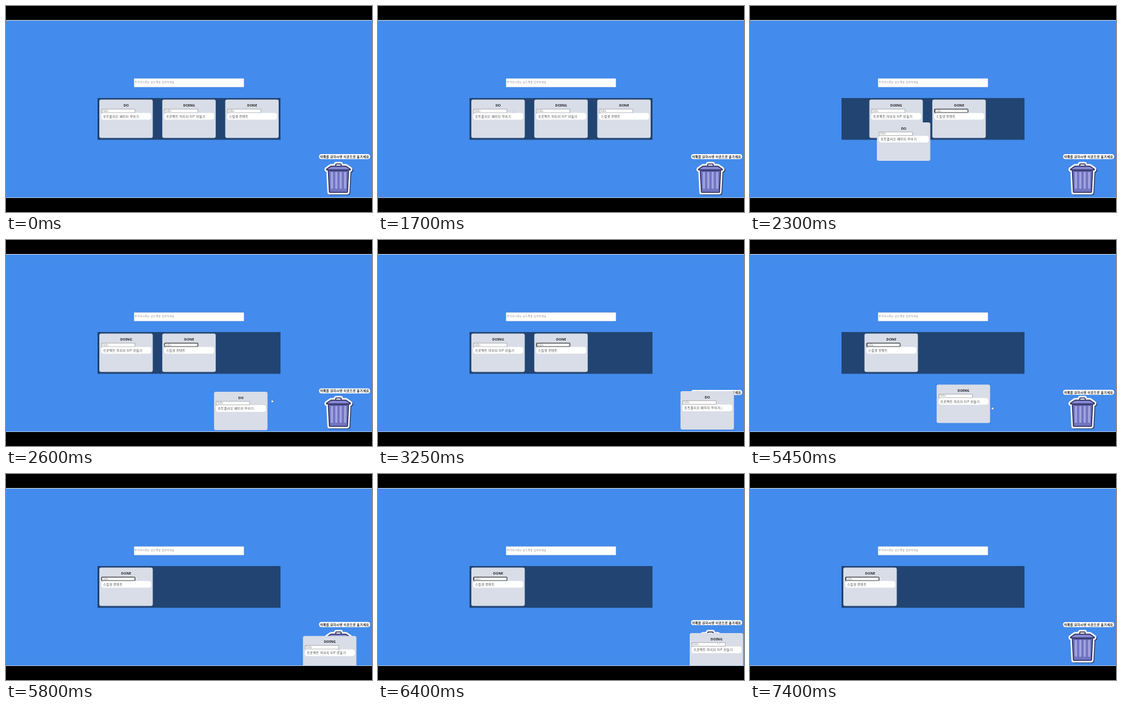
An HTML page with a canvas for the animation above (7.45 s loop, 600 by 338 pixels).

```html
<!DOCTYPE html>
<html lang="ko">
<head>
<meta charset="utf-8">
<style>
html, body { margin: 0; width: 100%; height: 100%; overflow: hidden; background: #000 }
canvas { display: block; width: 600px; height: 338px }
</style>
</head>
<body>
<canvas id="stage"></canvas>
<script>
const LOOP = 7450, GAP = 103.2, HOME = [153, 153.5], GRAB = [223, 173];
const KOREAN = '"Noto Sans CJK KR", "Noto Sans CJK", sans-serif';
const DARK = '#2b2a5a', PALE = '#f4f5fa';

// Each drag curves from the board past a bend to the bin
const drags = [
  { start: 2200, time: 1365, drop: 4400, slide: 2250, from: [330, 250], reach: 1300,
    bend: [348, 300], end: [513.5, 242.5], handBend: [474, 306], handEnd: [573.5, 273.5] },
  { start: 5300, time: 700, drop: 6950, slide: 5390, from: [573.5, 273.5], reach: 4550,
    bend: [364, 297], end: [511, 261], handBend: [487, 359], handEnd: [558.5, 277.5] }
];

const ratio = window.devicePixelRatio || 1;
const stage = document.getElementById('stage');
const c = stage.getContext('2d');
stage.width = 600 * ratio;
stage.height = 338 * ratio;

const clamp = v => Math.max(0, Math.min(1, v));
const easeOut = (p, power) => 1 - (1 - clamp(p)) ** power;
const curve = (a, b, d, u) =>
  a.map((v, i) => (1 - u) ** 2 * v + 2 * u * (1 - u) * b[i] + u * u * d[i]);

function box(x, y, w, h, fill, r = 0, stroke, line = .5) {
  c.beginPath();
  c.roundRect(x, y, w, h, r);
  c.fillStyle = fill;
  c.fill();
  if (!stroke) return;
  c.strokeStyle = stroke;
  c.lineWidth = line;
  c.stroke();
}

function text(s, x, y, font, color, align = 'left', spacing = 0) {
  c.font = font;
  c.fillStyle = color;
  c.textAlign = align;
  c.letterSpacing = spacing + 'px';
  c.fillText(s, x, y);
}

function card(title, task, [x, y], focus, caret) {
  box(x, y, 87.6, 63, '#d8dde7', 3);
  text(title, x + 44, y + 11.7, 'bold 5.6px "Noto Sans", "Open Sans", sans-serif', '#222', 'center');
  box(x + 3.6, y + 15.7, 54.8, 5.8, '#fff', focus ? .6 : 0, focus ? '#111' : '#858585', focus ? 1 : .6);
  text('ToDo', x + 4.6, y + 20.1, '4.2px ' + KOREAN, '#858585');
  if (caret) box(x + 4.5, y + 16.6, .4, 4, '#111');
  box(x + 3, y + 22, 82, 11, '#fff', 4);
  text(task, x + 6.2, y + 29.3, '5.1px ' + KOREAN, '#444', 'left', .4);
}

function trapezoid(top, topHalf, bottom, bottomHalf) {
  const path = new Path2D();
  path.moveTo(545 - topHalf, top);
  path.lineTo(545 + topHalf, top);
  path.lineTo(545 + bottomHalf, bottom);
  path.lineTo(545 - bottomHalf, bottom);
  path.closePath();
  return path;
}

const handle = trapezoid(260, 3.5, 264, 4);
const body = trapezoid(269, 15.8, 305, 14);
const lid = trapezoid(263.5, 12, 268.3, 18.8);

function paint(path, fill, stroke, width) {
  c.lineJoin = 'round';
  c.strokeStyle = stroke;
  c.lineWidth = width;
  c.stroke(path);
  c.fillStyle = fill;
  c.fill(path);
}

function trash() {
  const parts = [handle, body, lid];
  c.save();
  c.translate(1.4, 1.2);
  parts.forEach(p => paint(p, '#1f3560', '#1f3560', 8));
  c.restore();
  parts.forEach(p => paint(p, PALE, PALE, 8.4));
  paint(handle, PALE, DARK, 3.2);
  paint(body, '#7074c0', DARK, 3.2);
  for (let i = 0; i < 4; i++) box(532.5 + i * 7.2, 272, 3.6, 28, '#a0a3df', 1.5);
  box(530.5, 269.5, 29, 2, '#484886');
  paint(lid, '#8487d0', DARK, 3);
}

function label(t) {
  const bobbing = t > 2560 && t < 6860;
  const y = bobbing ? 3.3 * Math.sin((t - 2560) / 2150 * 2 * Math.PI) : 0;
  box(513.3, 243 + y, 83.6, 8.3, '#fff', 4);
  text('삭제를 원하시면 이곳으로 옮기세요', 555, 249 + y, 'bold 5.1px ' + KOREAN, '#222', 'center', .38);
}

function hand([x, y]) {
  c.beginPath();
  c.arc(x, y, 1.7, 0, 7);
  c.fillStyle = '#fff';
  c.fill();
  c.strokeStyle = '#4448';
  c.lineWidth = .5;
  c.stroke();
}

function draw(t) {
  c.setTransform(ratio, 0, 0, ratio, 0, 0);
  box(0, 0, 600, 338, '#000');
  box(0, 23, 600, 292, '#d5e0ec');
  c.save();
  c.beginPath();
  c.rect(0, 24, 600, 290.3);
  c.clip();
  box(0, 24, 600, 291, '#438bec');

  box(210, 119, 180, 14, '#fff', 0, '#b9c4d2');
  text('추가하시려는 보드명을 입력하세요', 211, 127.4, '4.1px ' + KOREAN, '#808080', 'left', .4);
  box(150, 151, 300, 68.5, '#224472');
  trash();
  label(t);

  const [left, left2] = drags.map(d => easeOut((t - d.slide) / 200, 3));
  const slot = n => [HOME[0] + GAP * n, HOME[1]];
  const focus = t >= drags[0].start;
  card('DONE', '스킬셋 컨텐트', slot(2 - left - left2), focus, focus && t % 1000 < 500);

  const movers = [['DO', '포트폴리오 페이지 꾸미기', 0], ['DOING', '프로젝트 이미지 GIF 만들기', 1 - left]];
  movers.reverse().forEach(([title, task, n], i) => {
    const d = drags[1 - i];
    if (t >= d.drop) return;
    const u = easeOut((t - d.start) / d.time, 2);
    card(title, task, t < d.start ? slot(n) : curve(HOME, d.bend, d.end, u));
  });

  const d = drags.find(d => t >= d.reach && t < d.drop);
  if (d) {
    const u = easeOut((t - d.start) / d.time, 2);
    const near = easeOut((t - d.reach) / 400, 2);
    hand(t < d.start ? curve(d.from, [350, 150], GRAB, near)
                     : curve(GRAB, d.handBend, d.handEnd, u));
  }
  c.restore();
}

const begin = performance.now();
function tick() {
  draw((performance.now() - begin) % LOOP);
  requestAnimationFrame(tick);
}
tick();
</script>
</body>
</html>
```
